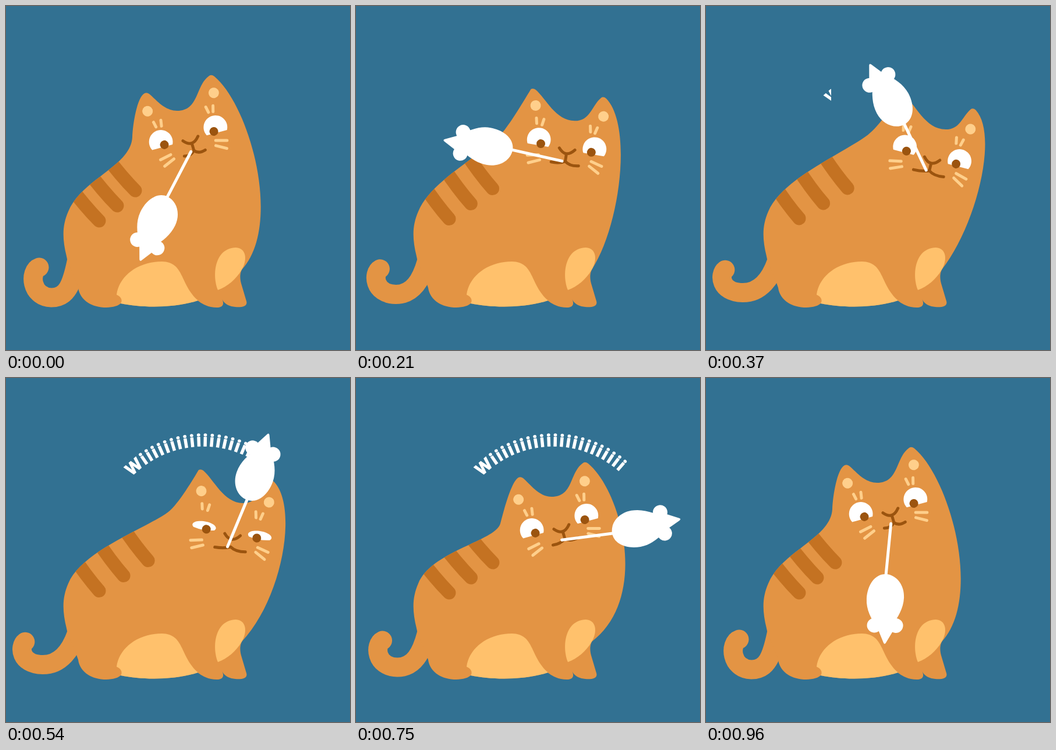
Write an HTML page that moves like this. It is 591 px wide and 591 px high and loops after 1000 ms.

```html
<!DOCTYPE html>
<html lang="en">
<head>
<meta charset="utf-8">
<title>Cat swinging a mouse</title>
<style>
  html, body { margin: 0; width: 100%; height: 100%; overflow: hidden; background: #327192; }
  svg { display: block; width: 100vw; height: 100vh; }
  .line { fill: none; stroke-linecap: round; stroke-linejoin: round; }
  .brown { stroke: #9b540f; stroke-width: 5; }
  .light { stroke: #ffcf8b; stroke-width: 5; }
  .tail { stroke: #e39444; stroke-width: 33; }
  .stripe { stroke: #c47222; stroke-width: 23; }
  .fur { fill: #e39444; }
  .belly { fill: #ffc16c; }
  .spot { fill: #ffcf8b; }
  .pupil { fill: #9b540f; }
  .white { fill: #fff; }
  text {
    font: 700 28px "Open Sans", "Noto Sans", sans-serif; letter-spacing: 2.1px;
    fill: #fff; stroke: #fff; stroke-width: 1.3;
  }
</style>
</head>
<body>
<svg viewBox="0 0 591 591">
  <defs>
    <path id="arc" d="M216.2,169 A171,171 0 0 1 487,202.5"/>
    <clipPath id="wipe"><rect id="wipeBox" height="300"/></clipPath>
    <clipPath id="inBody"><path class="body"/></clipPath>
  </defs>

  <g clip-path="url(#wipe)">
    <text id="word"><textPath href="#arc">Wiiiiiiiiiiiiiiiiiiiiii</textPath></text>
  </g>

  <path id="tail" class="line tail"/>
  <path class="body fur"/>
  <g clip-path="url(#inBody)">
    <path class="line stripe"/>
    <path class="line stripe"/>
    <path class="line stripe"/>
  </g>
  <path class="belly" d="M190,496 C194,465 225,439 268,439 C307,440 298,478 330,506 C290,519 235,519 197,511 C201,505 197,499 190,496Z"/>
  <path class="belly" d="M364,488 C354,465 357,416 395,415 C413,416 415,436 405,453 C395,470 380,482 364,488Z"/>

  <g id="face">
    <g id="crown">
      <circle class="spot" cx="-57" cy="-57" r="9"/>
      <circle class="spot" cx="61" cy="-58" r="9"/>
      <path class="line light" d="M-52,-36 L-50,-27 M-39,-36 L-40.5,-26 M41.5,-38 L43.5,-28 M54,-37 L51.5,-27"/>
    </g>
    <g transform="translate(-48.5)">
      <path class="eye white"/>
      <circle class="pupil" cx="4.5" cy="6.2" r="7.5"/>
    </g>
    <g transform="translate(48.5)">
      <path class="eye white"/>
      <circle class="pupil" cx="-4.5" cy="6.2" r="7.5"/>
    </g>
    <path id="whiskL" class="line light" d="M-57,29.5 L-38,25.5 M-53,42 L-34.5,34"/>
    <path id="whiskR" class="line light" d="M43,22 L62,27 M41,30.5 L58,40"/>
    <path id="mouth" class="line brown"/>
  </g>

  <g id="mouse">
    <path class="line" stroke="#fff" stroke-width="5" d="M0,0 L95,4.3"/>
    <path class="white" d="M87,4 C87,-14 104,-29 126,-29 C145,-29 160,-20 172,-13 L186,-12 L205,-2 Q208.5,0 205,2 L186,11 L178,16 C165,25 150,35 131,35 C106,35 87,22 87,4Z"/>
    <circle class="white" cx="174.5" cy="-17.5" r="12.5"/>
    <circle class="white" cx="176" cy="19.5" r="12.5"/>
  </g>
</svg>

<script>
const $ = id => document.getElementById(id);
const all = sel => [...document.querySelectorAll(sel)];
const set = (el, name, v) => el.setAttribute(name, v);
const clamp = v => Math.min(1, Math.max(0, v));

// Smooth curve through [time, value] knots that never overshoots.
function track(...k) {
  const last = k.length - 1;
  const slope = i => (k[i + 1][1] - k[i][1]) / (k[i + 1][0] - k[i][0]);
  const tan = k.map((_, i) => {
    if (i === 0 || i === last) return slope(Math.min(i, last - 1));
    const a = slope(i - 1), b = slope(i);
    return a * b <= 0 ? 0 : 2 * a * b / (a + b);
  });
  return t => {
    if (t <= k[0][0]) return k[0][1];
    if (t >= k[last][0]) return k[last][1];
    let i = 0;
    while (t >= k[i + 1][0]) i++;
    const h = k[i + 1][0] - k[i][0], u = (t - k[i][0]) / h, v = 1 - u;
    return k[i][1] * (1 + 2 * u) * v * v + tan[i] * h * u * v * v
      + k[i + 1][1] * u * u * (3 - 2 * u) - tan[i + 1] * h * u * u * v;
  };
}

// The whole cat follows two values: how far it leans right and how far its head turns.
const lean = track([-40, 0], [0, 0], [210, .68], [370, 1.05], [540, 1.05], [750, .5], [870, .13], [960, 0], [1000, 0]);
const turn = track([-40, 0], [0, 0], [210, .85], [370, 1.02], [540, .86], [750, 0], [1000, 0]);
const squint = track([370, 0], [460, 1], [620, 1], [710, 0]);
const spin = track([-130, 47], [-40, 93], [0, 115], [210, 190], [370, 242], [540, 290],
  [750, 350], [870, 407], [960, 453], [1000, 475], [1210, 550]);

const legs = "C401,462 402,470 405,480 L413,507 C416,517 403,518 394,517 C381,516 374,510 371,503"
  + " C375,511 374,518 362,518 C345,518 335,510 329,506 C290,519 235,519 197,511"
  + " C190,517 180,518 168,518 C140,516 126,500 124,484 C118,465 106,445 104,430Z";

function outline(v, u) {
  const point = (x, y, vx, vy, ux, uy) => (dx = 0, dy = 0) =>
    `${x + vx * v + ux * u + dx},${y + vy * v + uy * u + dy} `;
  const neck = point(217, 225, 62, 50, -4, -55);
  const earL = point(242, 148, 82, 42, 8, -42);
  const dip = point(294, 180, 84, 48, 29, -18);
  const earR = point(353, 117, 82, 52, 19, 3);
  const chest = point(475, 377, 60, 0, -72, 0);
  const nx = -2 - 12 * v - 28 * u, ny = 50 - 40 * v + 24 * u;
  return "M104,430 C96,398 97,376 107,353 "
    + "C130,297 " + neck(nx, ny) + neck()
    + "C" + neck(-.45 * nx, -.45 * ny) + earL(-17 + 6 * u, 9 + 7 * u) + earL(-4, 2)
    + "Q" + earL() + earL(4, 3)
    + "C" + earL(16 + 7 * u, 13 + 6 * u) + dip(-22 - 13 * u) + dip()
    + "C" + dip(38 - 13 * u) + earR(-28 + 9 * u, 20 - 4 * u) + earR(-4, 3)
    + "Q" + earR() + earR(5, 4)
    + "C" + earR(67 - 10 * v - 12 * u, 56 - 9 * v) + chest() + "405,453 " + legs;
}

const bodies = all(".body"), eyes = all(".eye"), stripes = all(".stripe");

function draw(t) {
  const v = lean(t), u = turn(t), q = squint(t);

  const shape = outline(v, u);
  bodies.forEach(el => set(el, "d", shape));
  stripes.forEach((el, n) => {
    const x = 160 + n * (31 + 13 * v - 3 * u), y = 369 - 4 * u - 26 * n;
    const dx = 38 - 5 * u, dy = 45;
    set(el, "d", `M${x - 1.4 * dx},${y - 1.4 * dy} Q${x - .6 * dx - 2},${y - .6 * dy + 2} ${x},${y}`);
  });
  set($("tail"), "d", `M${57 - 23 * v},${449 + 4 * v} C${40 - 16 * v},${455 + 5 * v}`
    + ` ${42 - 18 * v},${500 - 8 * v} ${78 - 14 * v},${501 - 8 * v}`
    + ` C${105 - 10 * v},${501 - 8 * v} ${113 - v},${478 - 12 * v} 121,440`);

  const x = 313 + 72 * v, y = 221 + 56 * v - 25 * u + 3 * q, a = -15 + 29 * u;
  set($("face"), "transform", `translate(${x} ${y}) rotate(${a})`);
  set($("crown"), "transform", `translate(${-8 * u})`);
  set($("whiskL"), "transform", `translate(${-10 * v})`);
  set($("whiskR"), "transform", `translate(${5 * v})`);
  eyes.forEach(el => {
    set(el, "d", `M-18,9.5 A20.4,20.4 0 1 1 18,9.5 Q0,${9.5 + 10 * q} -18,9.5Z`);
    set(el, "transform", `translate(0 ${2 * q}) scale(1 ${1 - .58 * q})`);
  });
  set($("mouth"), "d", `M-11.5,8 Q2,24 15.5,7 M2.2,${16 + 13 * q} L2.5,29`
    + ` M${-16 - 8 * v},34 Q${-5 - 4 * v},${37 - 3 * v} 2.5,29 Q${9 + 3 * v},${37 - v} ${21.5 + 7 * v},33`);

  const r = a * Math.PI / 180, c = Math.cos(r), s = Math.sin(r);
  set($("mouse"), "transform",
    `translate(${x - 3 * c - 29.5 * s} ${y - 3 * s + 29.5 * c}) rotate(${spin(t)})`);

  set($("wipeBox"), "width", Math.max(0, 215 + (t - 370) * 1.2));
  set($("word"), "opacity", clamp((922 - t) / 130));
}

// 24 steps per second, on a 10 ms grid.
const STEPS = [0, 40, 80, 120, 170, 210];
const start = performance.now();
function tick() {
  const t = Math.max(0, performance.now() - start) % 1000, part = t % 250;
  draw(t - part + STEPS.filter(s => s <= part).pop());
  requestAnimationFrame(tick);
}
tick();
</script>
</body>
</html>
```
